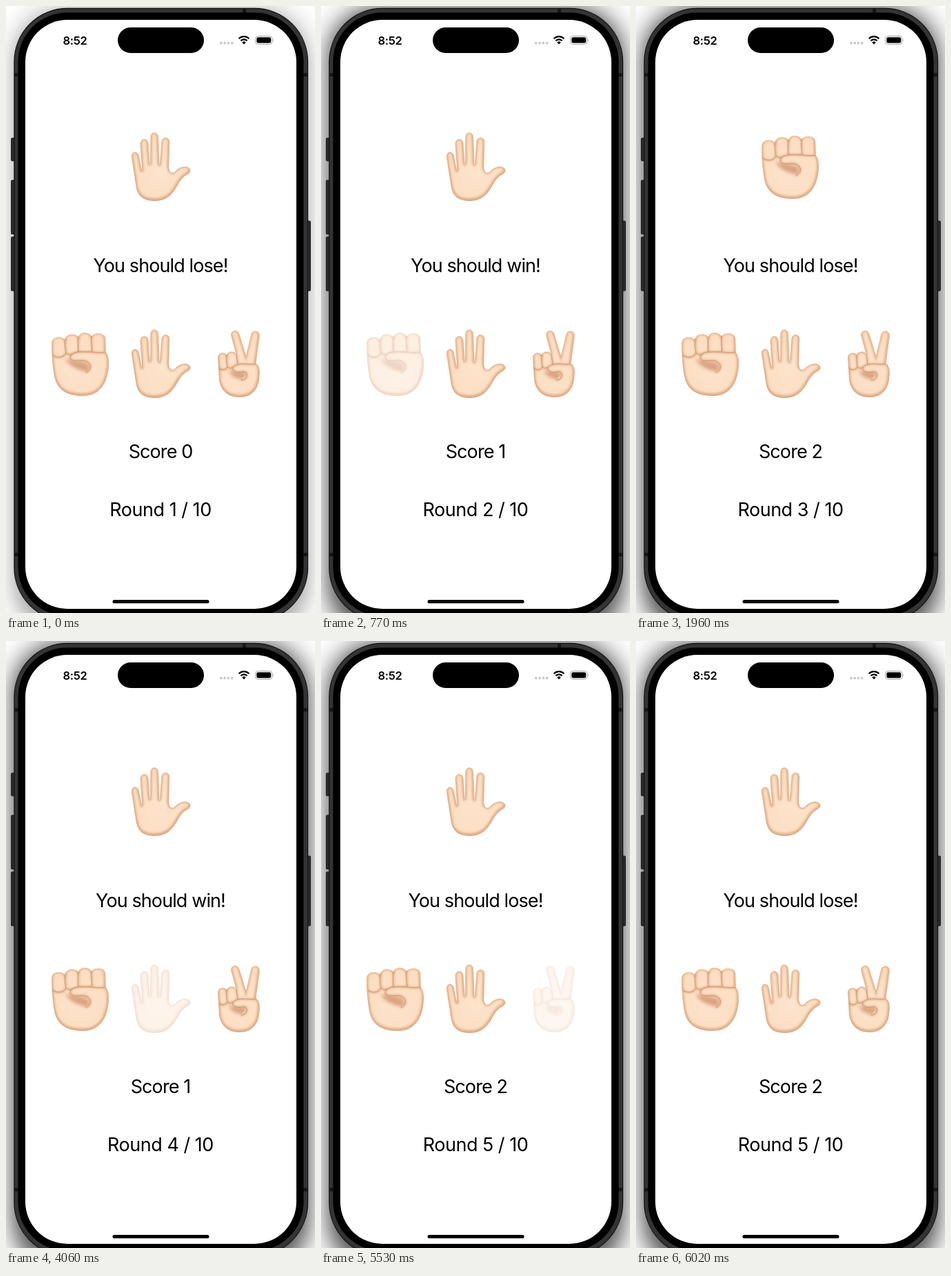
An HTML page for the animation above (8000 ms loop, 448 by 878 pixels).

```html
<!DOCTYPE html>
<html lang="en">
<head>
<meta charset="utf-8">
<title>Hand game</title>
<style>
  html, body { margin: 0; width: 100%; height: 100%; overflow: hidden; background: #fff; }
  svg { display: block; width: 448px; height: 878px; }
  text { font-family: Inter, "Open Sans", sans-serif; font-optical-sizing: none; text-anchor: middle; }
  .label { font-size: 27px; letter-spacing: -.9px; }
  .count { letter-spacing: -.48px; }
  .clock { font-size: 16.5px; font-weight: 600; letter-spacing: -.3px; }

  .scene, .shadow { animation: 8s step-end infinite; }
  .soft { animation-name: soft; }
  .deep { animation-name: deep; }
  .round1 { animation-name: round1; }
  .round2 { animation-name: round2; }
  .round3 { animation-name: round3; }
  .round4 { animation-name: round4; }
  .round5 { animation-name: round5; }
  @keyframes soft { 0% { opacity: 1 } 7%, 100% { opacity: 0 } }
  @keyframes deep { 0% { opacity: 0 } 7%, 100% { opacity: 1 } }
  @keyframes round1 { 0% { opacity: 1 } 8.75%, 100% { opacity: 0 } }
  @keyframes round2 { 0% { opacity: 0 } 8.75% { opacity: 1 } 24.5%, 100% { opacity: 0 } }
  @keyframes round3 { 0% { opacity: 0 } 24.5% { opacity: 1 } 50.75%, 100% { opacity: 0 } }
  @keyframes round4 { 0% { opacity: 0 } 50.75% { opacity: 1 } 69.125%, 100% { opacity: 0 } }
  @keyframes round5 { 0% { opacity: 0 } 69.125%, 100% { opacity: 1 } }

  /* a pressed button dims at once, then recovers every 70 ms */
  .button { animation: 8s step-end infinite; }
  .rock { animation-name: rock; }
  .paper { animation-name: paper; }
  .scissors { animation-name: scissors; }
  @keyframes rock {
    0%, 14%, 100% { opacity: 1 }
    8.75% { opacity: .36; animation-timing-function: steps(6, end) }
  }
  @keyframes paper {
    0%, 56%, 100% { opacity: 1 }
    50.75% { opacity: .36; animation-timing-function: steps(6, end) }
  }
  @keyframes scissors {
    0%, 75.25%, 100% { opacity: 1 }
    69.125% { opacity: .24; animation-timing-function: steps(7, end) }
  }

  .shade { fill: none; stroke: #d08c5c; stroke-width: 4.5; opacity: .6; filter: url(#blur2); transform: translate(-.3px, -1.2px); }
  .edge { fill: none; stroke: url(#edge); stroke-width: .7; }
  .crease { fill: none; stroke: #cb936c; stroke-width: .9; stroke-linecap: round; stroke-linejoin: round; }
  .glow { fill: none; stroke: #cf8f64; stroke-width: 3; opacity: .5; filter: url(#blur2); }
  .dent { fill: #bd7047; opacity: .55; filter: url(#blur3); }
</style>
</head>
<body>
<svg viewBox="0 0 448 878">
  <defs>
    <filter id="blur2" x="-30%" y="-30%" width="160%" height="160%"><feGaussianBlur stdDeviation="1.6"/></filter>
    <filter id="blur3" x="-40%" y="-40%" width="180%" height="180%"><feGaussianBlur stdDeviation="2.6"/></filter>
    <filter id="blur9" x="-20%" y="-20%" width="140%" height="140%"><feGaussianBlur stdDeviation="9"/></filter>
    <filter id="blur18" x="-20%" y="-20%" width="140%" height="140%"><feGaussianBlur stdDeviation="18"/></filter>
    <linearGradient id="edge" x2="0" y2="1">
      <stop stop-color="#ebc6a4"/><stop offset="1" stop-color="#c48a66"/>
    </linearGradient>
    <radialGradient id="skin" cx=".5" cy=".55" r=".62">
      <stop stop-color="#fde4cd"/><stop offset="1" stop-color="#fbdcbf"/>
    </radialGradient>

    <path id="palmShape" d="M.4 36C-1 27 9 26 10.500 34L14.800 56Q15.800 57 15.600 54L12.800 17C12.500 8 23.500 7 24.200 16L26.200 46Q26.900 48 27.400 46L27.600 7C27.400-2 38.600-2 38.800 7L40 47Q40.500 49 41.200 47L43.600 14C44 5 55.500 6 55 14L53.800 49C53.800 57 58 61.500 63 57C68 51 75 49 80 50C86 52 86.500 56 82.500 59.500C75 63 70.500 69 66.500 76C60 88 52 98.500 34 98.500C17 98.500 9.500 92 7 78Z"/>
    <path id="fistShape" d="M.5 15C1 6 15 5 19.500 11C21 1 35 1 39 7C41-1 54-1 58 6C62 0 77 0 78 8.500L78.500 29C83 34 83.400 44 82 54C79 76 68 91.500 46 91.500C23 91.500 9 84 4.500 64C2 50 0 30 .5 15Z"/>
    <path id="vShape" d="M19.800 9C17 1 28-3 31 5L41 38L48.500 6C51-2 62 1 60.500 9L55 48C60 51 61 58 60 66C59.500 83 51 96.500 32 96.500C15 96.500 5 88 2.500 72L.4 40C0 32 10 31 13 36C15 30 25 30 27 35Z"/>
    <path id="fistThumb" d="M78 29C70 31 55 27 40 28.500C28 29.500 25 36 29 39.500C34 43 44 39 51 42C59 47 58 54 50 58"/>
    <path id="vThumb" d="M55 49C45 50 35 47 28 50C20 52 20 58 26 60C33 62 40 57 42 63C43 69 38 72 34 72"/>
    <clipPath id="palmClip"><use href="#palmShape"/></clipPath>
    <clipPath id="fistClip"><use href="#fistShape"/></clipPath>
    <clipPath id="vClip"><use href="#vShape"/></clipPath>

    <g id="palm">
      <g clip-path="url(#palmClip)">
        <use href="#palmShape" fill="url(#skin)"/>
        <use href="#palmShape" class="shade"/>
      </g>
      <use href="#palmShape" class="edge"/>
    </g>
    <g id="fist">
      <g clip-path="url(#fistClip)">
        <use href="#fistShape" fill="url(#skin)"/>
        <use href="#fistShape" class="shade"/>
        <path class="dent" d="M20 38C28 42 40 41 50 44C57 48 56 56 50 57C38 54 26 50 20 38Z"/>
        <path class="glow" d="M20 9L21 30M39 5V28M58 4L59 27M1 32C6 38 17 38 21 30C25 33 36 32 39 28C43 31 56 31 59 27"/>
        <use href="#fistThumb" fill="#fcdfc4"/>
        <use href="#fistThumb" class="glow"/>
      </g>
      <path class="crease" d="M20 9C18 16 20 24 21 30M39 6C38 12 38 22 39 28M58 5C57 12 58 20 59 27M2 33C6 37 17 38 21 30C24 33 28 33 30 32"/>
      <use href="#fistThumb" class="crease"/>
      <use href="#fistShape" class="edge"/>
    </g>
    <g id="victory">
      <g clip-path="url(#vClip)">
        <use href="#vShape" fill="url(#skin)"/>
        <use href="#vShape" class="shade"/>
        <path class="dent" d="M16 58C22 61 32 59 39 61C42 65 40 71 35 71C27 70 19 67 16 58Z"/>
        <path class="glow" d="M13 35L14 53M27 34L29 49M1 54C4 59 12 59 14 53C17 56 20 55 22 53"/>
        <use href="#vThumb" fill="#fcdfc4"/>
        <use href="#vThumb" class="glow"/>
      </g>
      <path class="crease" d="M13 36C12 41 13 48 14 53M27 35L29 49M1 54C4 58 12 58 14 53C17 56 20 55 22 53"/>
      <use href="#vThumb" class="crease"/>
      <use href="#vShape" class="edge"/>
    </g>
  </defs>

  <rect width="448" height="878" fill="#fff"/>
  <g class="shadow soft">
    <rect x="8" y="2" width="433" height="910" rx="72" opacity=".24" filter="url(#blur18)"/>
    <rect x="11" y="6" width="427" height="900" rx="76" opacity=".1" filter="url(#blur9)"/>
  </g>
  <g class="shadow deep">
    <rect x="8" y="0" width="433" height="914" rx="72" opacity=".56" filter="url(#blur18)"/>
    <rect x="11" y="3" width="427" height="900" rx="76" opacity=".18" filter="url(#blur9)"/>
  </g>

  <g fill="#2a2a2c" stroke="#111" stroke-width=".8">
    <rect x="7.400" y="191" width="7" height="33" rx="1.500"/>
    <rect x="7.400" y="252" width="7" height="78" rx="1.500"/>
    <rect x="7.400" y="334" width="7" height="78" rx="1.500"/>
    <rect x="434.600" y="311" width="7" height="101" rx="1.500"/>
  </g>
  <rect x="12" y="3.500" width="425.500" height="886" rx="77" fill="#343436" stroke="#19191a" stroke-width="1.400"/>
  <path d="M12 97h6v5h-6zM431 97h6v5h-6zM12 791h6v5h-6zM431 791h6v5h-6zM343 4h5v6h-5z" fill="#161617"/>
  <rect x="17.500" y="9.500" width="414" height="873" rx="71"/>
  <rect x="28" y="20" width="393" height="852" rx="61" fill="#fff"/>
  <rect x="162" y="31" width="125" height="37" rx="18.500"/>
  <rect x="154.500" y="859" width="140" height="5" rx="2.500"/>

  <text class="clock" x="100" y="55.500">8:52</text>
  <path d="M311.800 53.700h17" stroke="#c9c9cb" stroke-width="3.800" stroke-linecap="round" stroke-dasharray="0 5.300"/>
  <path d="M337.600 47.200a10.500 10.500 0 0 1 14.800 0M340.400 50.300a6.600 6.600 0 0 1 9.200 0" fill="none" stroke="#000" stroke-width="2.300"/>
  <path d="M345 55.500l-2.700-2.800a3.800 3.800 0 0 1 5.400 0z"/>
  <rect x="361.500" y="43.500" width="24.500" height="11.800" rx="3.800" fill="none" stroke="#a5a5a7"/>
  <rect x="363.300" y="45.200" width="20.900" height="8.400" rx="2.300"/>
  <path d="M387.200 47.500q1.700 1.900 0 3.900z" fill="#a5a5a7"/>

  <g class="scene round1">
    <use href="#palm" x="182" y="183"/>
    <text class="label" x="224" y="385">You should lose!</text>
    <text class="label" x="224" y="654">Score 0</text>
    <text class="label count" x="224" y="738">Round 1 / 10</text>
  </g>
  <g class="scene round2">
    <use href="#palm" x="182" y="183"/>
    <text class="label" x="224" y="385">You should win!</text>
    <text class="label" x="224" y="654">Score 1</text>
    <text class="label count" x="224" y="738">Round 2 / 10</text>
  </g>
  <g class="scene round3">
    <use href="#fist" x="182" y="187"/>
    <text class="label" x="224" y="385">You should lose!</text>
    <text class="label" x="224" y="654">Score 2</text>
    <text class="label count" x="224" y="738">Round 3 / 10</text>
  </g>
  <g class="scene round4">
    <use href="#palm" x="182" y="183"/>
    <text class="label" x="224" y="385">You should win!</text>
    <text class="label" x="224" y="654">Score 1</text>
    <text class="label count" x="224" y="738">Round 4 / 10</text>
  </g>
  <g class="scene round5">
    <use href="#palm" x="182" y="183"/>
    <text class="label" x="224" y="385">You should lose!</text>
    <text class="label" x="224" y="654">Score 2</text>
    <text class="label count" x="224" y="738">Round 5 / 10</text>
  </g>

  <g class="button rock"><use href="#fist" x="66" y="472"/></g>
  <g class="button paper"><use href="#palm" x="182" y="468"/></g>
  <g class="button scissors"><use href="#victory" x="307" y="469"/></g>
</svg>
</body>
</html>
```
